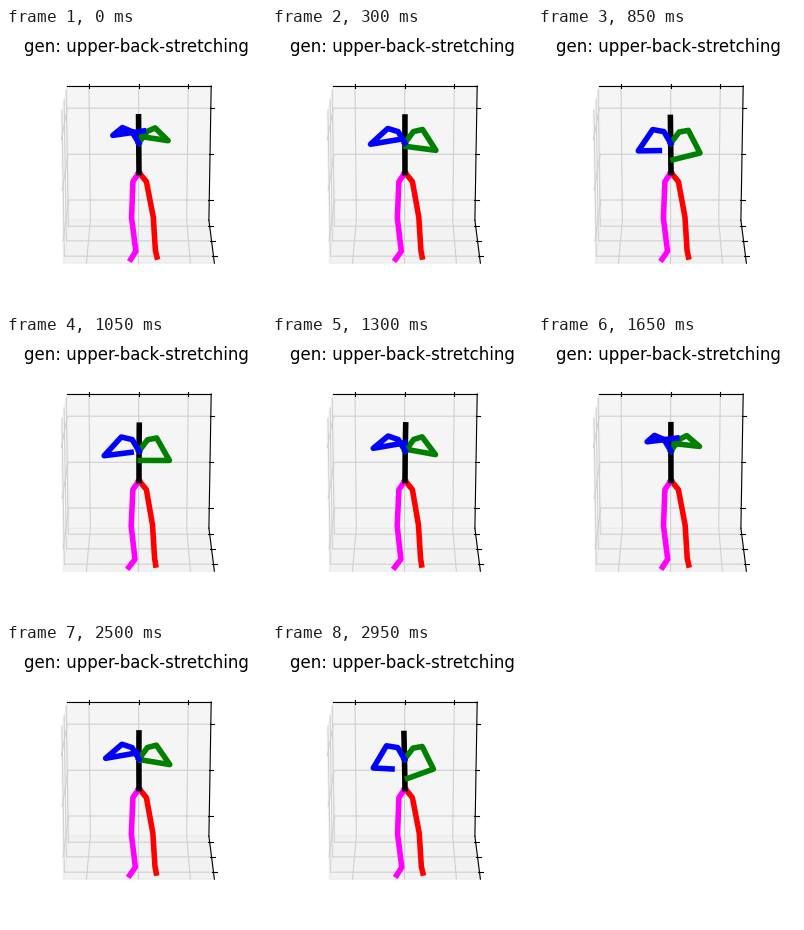
A matplotlib script for the animation above (3 s loop, 260 px wide and 280 px high).

```python
import numpy as np
import matplotlib.pyplot as plt
from matplotlib.animation import FuncAnimation

W, H, DPI = 260, 280, 100
FRAMES, STEP = 60, 50
CYCLE, LOWEST = 2250, 680  # ms per arm swing, and when the arms hang lowest

plt.rcParams["font.family"] = "DejaVu Sans"
fig = plt.figure(figsize=(W / DPI, H / DPI), dpi=DPI, facecolor="white")
ax = fig.add_axes([0, 0, 1, 1])
ax.set_xlim(0, W)
ax.set_ylim(H, 0)
ax.axis("off")
ax.text(130.4, 24, "gen: upper-back-stretching", fontsize=12, ha="center")

# corners of the box: back wall, then front edge
BTL, BTR = (61, 58), (205.2, 58)
BBL, BBR = (63, 192.2), (202.9, 192.2)
FTL, FBL, FBR = (55, 87), (57.4, 235.2), (208.4, 235.2)


def mix(a, b, k):
    return a[0] + (b[0] - a[0]) * k, a[1] + (b[1] - a[1]) * k


def line(points, color, width, **kw):
    return ax.plot(*zip(*points), color=color, lw=width, **kw)[0]


def pane(grey, *corners):
    ax.fill(*zip(*corners), fc=(grey,) * 3, ec=(grey,) * 3, lw=1, alpha=0.5)


def grid(*points):
    line(points, "#d0d0d0", 0.8)


def axis(*points):
    line(points, "black", 0.8)


def side_tick(end):
    x, y = end
    axis((x - 1.2, y), (x + 3.4, y))


def draw_box():
    pane(0.95, FTL, BTL, BBL, FBL)
    pane(0.90, BBL, BBR, FBR, FBL)
    pane(0.925, BTL, BTR, BBR, BBL)

    for x in (83, 132.7, 182.3):
        k = (x - BTL[0]) / (BTR[0] - BTL[0])
        grid((x, BTL[1]), mix(BBL, BBR, k), mix(FBL, FBR, k))
        axis((x, 55.5), (x, 60))
    for y in (80.2, 126.3, 172):
        k = (y - BTL[1]) / (BBL[1] - BTL[1])
        end = mix(BTR, BBR, k)
        grid(mix(FTL, FBL, k), mix(BTL, BBL, k), end)
        side_tick(end)
    for y in (198.2, 212.8, 228.2):
        k = (y - BBL[1]) / (FBL[1] - BBL[1])
        end = mix(BBR, FBR, k)
        grid(mix(BTL, FTL, k), mix(BBL, FBL, k), end)
        side_tick(end)

    for a, b in ((BTL, BTR), (BTR, BBR), (BBR, FBR)):
        axis(a, b)


def pose(t):
    phase = 2 * np.pi * (t - LOWEST) / CYCLE
    lag = np.sin(phase)
    # low: 0 with arms raised, 1 with arms down; bow: elbows out in between
    low = ((1 + np.cos(phase - 0.2 * lag ** 2)) / 2) ** 2.5
    bow = np.sin(np.pi * low ** 0.7)
    sway = 0.1 + 1.1 * bow + 0.4 * lag
    lean = 0.9 * bow + 0.4 * lag - 0.8 * low

    def arm(x, y, low_x, low_y, bow_x, bow_y):
        return x + low_x * low + bow_x * bow, y + low_y * low + bow_y * bow

    def leg(x, y, share):
        return x - share * sway, y

    hip = (133, 144.6)
    chest = (132.8 + 0.4 * lean, 115 + 0.3 * low)
    return {
        "red": [hip, (140.4, 153.6), leg(147.3, 189, 0.6),
                leg(149.4, 222.3, 0.6), leg(151, 229, 1)],
        "magenta": [hip, (126.9, 153.6), leg(125.6, 190, 0.3),
                    leg(129.9, 223.2, 0.7), leg(124.9, 231.2, 1.5)],
        "black": [hip, chest, (132.7 + lean, 88.7 + 0.8 * low)],
        "green": [chest, (141.3 + 0.4 * lean, 103.3 + 0.8 * low),
                  arm(148.7, 99.6, 1.5, 2.9, 1.3, 0.8),
                  arm(161.4, 110.3, 0, 14.8, 2.5, 6.5),
                  arm(136, 107.5, -0.5, 27, -1.8, 0.8)],
        "blue": [chest, (126 + 0.4 * lean, 103.6),
                 arm(116.5, 99.4, -2, 2.4, 0, 0.2),
                 arm(109.3, 105.7, -8, 18.3, -7.8, 3.7),
                 arm(139, 102, -19, 23, -3, 0.6)],
    }


draw_box()
limbs = {color: line(points, color, 4, solid_joinstyle="round",
                     solid_capstyle="projecting")
         for color, points in pose(0).items()}


def update(i):
    for color, points in pose(i * STEP).items():
        limbs[color].set_data(*zip(*points))
    return list(limbs.values())


anim = FuncAnimation(fig, update, frames=FRAMES, interval=STEP,
                     repeat=True, repeat_delay=0)
plt.show()
```
